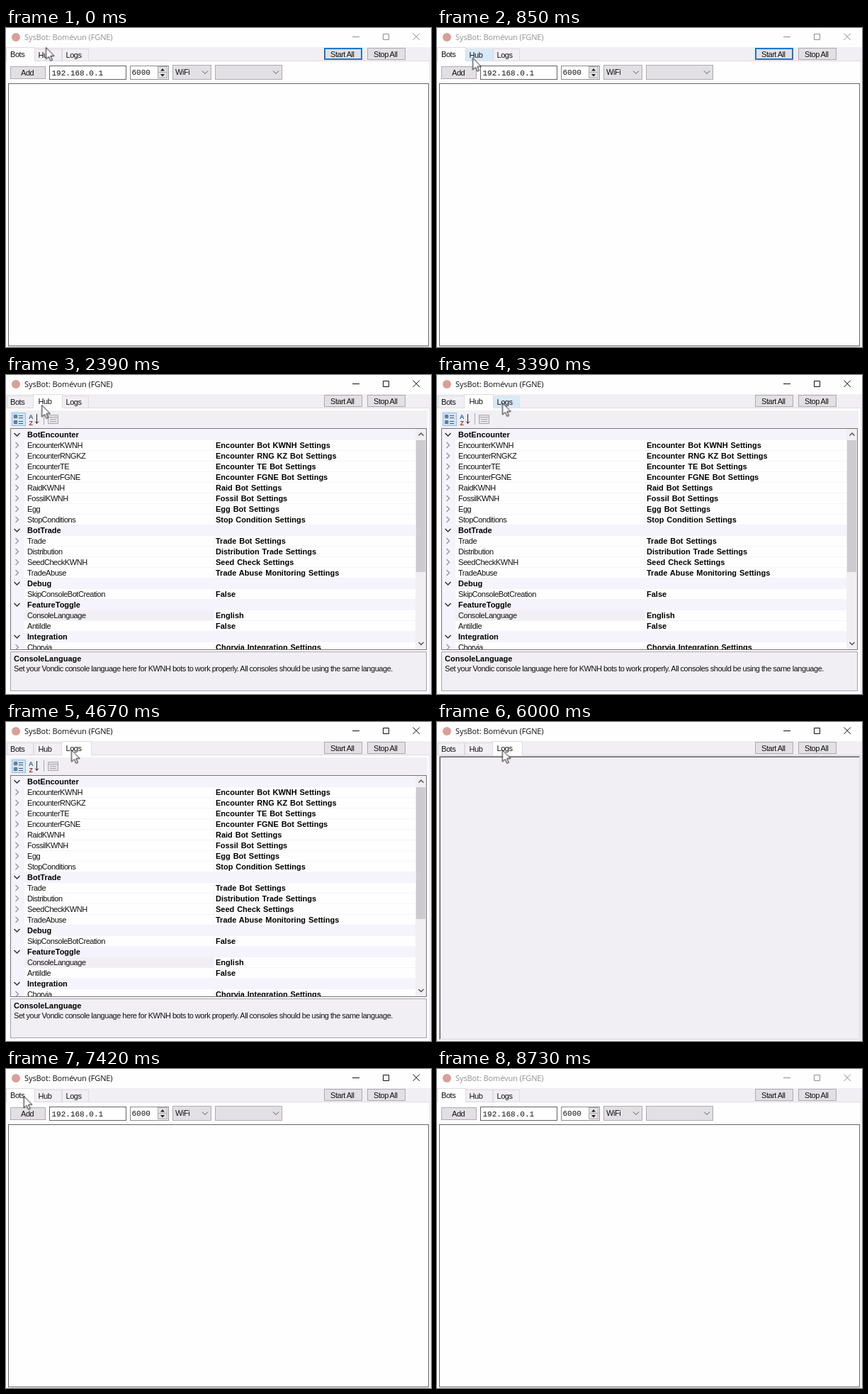
These frames come from a looping animation (600x450 px, 8.91 s). An HTML page:

```html
<!DOCTYPE html>
<html lang="en">
<head>
<meta charset="utf-8">
<title>SysBot</title>
<style>
html, body { margin: 0; width: 100%; height: 100%; overflow: hidden; background: #fff; }
svg { display: block; width: 600px; height: 450px; }
text { font: 11px "Liberation Sans", Arial, sans-serif; letter-spacing: -.45px; word-spacing: -.25px; fill: #111; white-space: pre; }
.bold { font-weight: bold; letter-spacing: 0; word-spacing: .8px; fill: #000; }
.mono { font-family: "Liberation Mono", monospace; letter-spacing: 0; }
.title { font: 11px "Open Sans", "Noto Sans", sans-serif; letter-spacing: -.1px; word-spacing: 0; }
.line { fill: none; stroke: #222; }
.crisp rect, rect.crisp { shape-rendering: crispEdges; }
.button { fill: #e2e0e4; stroke: #adabaf; }
.idle { fill: #f1eff3; stroke: #dddbdf; }
.hot { fill: #d8e9f8; stroke: #d8e4ef; }
.front { fill: #fefefe; stroke: #dddbdf; }

/* Every part shares one 8910 ms clock. */
.timed { animation: 8910ms step-end infinite; }
.inactive { animation-name: inactive; }
.active { animation-name: active; }
.focus { animation-name: focus; }
.bots-tab { animation-name: bots-tab; }
.hub-tab { animation-name: hub-tab; }
.logs-tab { animation-name: logs-tab; }
.bots-hot { animation-name: bots-hot; }
.hub-hot { animation-name: hub-hot; }
.logs-hot { animation-name: logs-hot; }
.bots-bar { animation-name: bots-bar; }
.bots-list { animation-name: bots-list; }
.hub-start { animation-name: hub-start; }
.hub-help { animation-name: hub-help; }
.hub-grid { animation-name: hub-grid; }
.logs-page { animation-name: logs-page; }
.pointer { animation: pointer 8910ms ease-in-out infinite; }

@keyframes inactive { 0%, 97.98% { visibility: visible } 17.059%, 100% { visibility: hidden } }
@keyframes active { 0%, 97.98%, 100% { visibility: hidden } 17.059% { visibility: visible } }
@keyframes focus { 0% { visibility: visible } 17.059%, 100% { visibility: hidden } }
@keyframes bots-tab { 0%, 80.584%, 100% { visibility: visible } 17.059% { visibility: hidden } }
@keyframes hub-tab { 0%, 52.413%, 100% { visibility: hidden } 17.059% { visibility: visible } }
@keyframes logs-tab { 0%, 80.584%, 100% { visibility: hidden } 52.413% { visibility: visible } }
@keyframes bots-hot { 0%, 80.584%, 100% { visibility: hidden } 74% { visibility: visible } }
@keyframes hub-hot { 0%, 17.059%, 74%, 100% { visibility: hidden } 3.4%, 70.3% { visibility: visible } }
@keyframes logs-hot { 0%, 52.413%, 100% { visibility: hidden } 32.4% { visibility: visible } }
@keyframes bots-bar { 0%, 80.92%, 100% { visibility: visible } 18.743% { visibility: hidden } }
@keyframes bots-list { 0%, 80.92%, 100% { visibility: visible } 17.396% { visibility: hidden } }
@keyframes hub-start { 0%, 18.743%, 100% { visibility: hidden } 17.396% { visibility: visible } }
@keyframes hub-help { 0%, 53.086%, 100% { visibility: hidden } 17.396% { visibility: visible } }
@keyframes hub-grid { 0%, 53.086%, 100% { visibility: hidden } 18.743% { visibility: visible } }
@keyframes logs-page { 0%, 80.92%, 100% { visibility: hidden } 53.086% { visibility: visible } }
@keyframes pointer {
  0%, .337% { transform: translate(56.5px, 27.5px) }
  10.213%, 26.487% { transform: translate(50.5px, 42.5px) }
  36.364%, 38.04% { transform: translate(92.5px, 40.5px) }
  38.05%, 67% { transform: translate(92.5px, 39.5px) }
  77.217%, 82.9% { transform: translate(25.5px, 38.5px) }
  90.46%, 100% { transform: translate(-16px, 14px) }
}
</style>
</head>
<body>
<svg viewBox="0 0 600 450">
  <defs>
    <clipPath id="gridClip"><rect x="6" y="75" width="588" height="312"/></clipPath>
    <g id="windowButtons" fill="none" stroke="currentColor">
      <path d="M489 12.5h10M532.5 8.5h8v8h-8z"/>
      <path d="M574.5 7.5l9.5 9.5m0-9.5l-9.5 9.5"/>
    </g>
    <path id="down" d="M-4-2L0 2 4-2" fill="none"/>
  </defs>
  <rect width="600" height="450" fill="#fefefe"/>

  <circle cx="14" cy="13" r="6" fill="#d99f98"/>
  <g class="timed inactive" color="#8f8f8f">
    <text class="title" x="26" y="17" style="fill:#929292">SysBot: Bomévun (FGNE)</text>
    <use href="#windowButtons"/>
  </g>
  <g class="timed active" color="#111">
    <text class="title" x="26" y="17">SysBot: Bomévun (FGNE)</text>
    <use href="#windowButtons"/>
  </g>

  <rect y="27" width="600" height="20" fill="#f1eff3"/>
  <path d="M0 46.5H598.5V450" class="line" style="stroke:#dddbdf"/>
  <rect x="0" y="47" width="598" height="403" fill="#fefefe"/>
  <g id="tabs" class="crisp"></g>

  <g class="crisp">
    <rect class="button" x="449.5" y="28.5" width="53" height="16"/>
    <rect class="button" x="510.5" y="28.5" width="53" height="16"/>
    <rect class="timed focus" x="450" y="29" width="52" height="15" fill="none" stroke="#1279d2" stroke-width="2"/>
    <text x="458" y="41">Start All</text>
    <text x="519" y="41">Stop All</text>
  </g>

  <g class="timed bots-bar crisp">
    <rect class="button" x="6.5" y="54.5" width="49" height="17"/>
    <text x="21" y="67">Add</text>
    <rect x="61.5" y="53.5" width="108" height="19" fill="#fff" stroke="#626262"/>
    <text class="mono" x="64.5" y="67">192.168.0.1</text>
    <rect x="175.5" y="53.5" width="54" height="19" fill="#fff" stroke="#8c8b8e"/>
    <text class="mono" x="177.5" y="66">6000</text>
    <rect class="button" x="214.5" y="54.5" width="13" height="8"/>
    <rect class="button" x="214.5" y="62.5" width="13" height="8"/>
    <path d="M218 60.5h6l-3-3.5zM218 65h6l-3 3.5z" fill="#222"/>
    <rect class="button" x="235.5" y="52.5" width="54" height="20"/>
    <text x="239" y="66">WiFi</text>
    <rect class="button" x="295.5" y="52.5" width="94" height="20"/>
    <use href="#down" x="281" y="62.5" stroke="#555"/>
    <use href="#down" x="381" y="62.5" stroke="#555"/>
  </g>
  <rect class="timed bots-list crisp" x="3.5" y="78.5" width="593" height="370" fill="#fefefe" stroke="#646368"/>
  <path class="timed hub-start line" d="M6 78.5H594" style="stroke:#646368"/>

  <g class="timed hub-help crisp">
    <rect x="6.5" y="390.5" width="587" height="55" fill="#f1eff3" stroke="#a5a1ab"/>
    <text class="bold" x="11" y="404">ConsoleLanguage</text>
    <text x="11" y="418">Set your Vondic console language here for KWNH bots to work properly. All consoles should be using the same language.</text>
  </g>

  <g class="timed hub-grid">
    <rect x="5" y="50" width="590" height="25" rx="2" fill="#f1eff3"/>
    <rect x="8.5" y="53.5" width="19" height="18" fill="#cfe4f7" stroke="#8fc0e8"/>
    <path class="line" d="M11.5 56.5h4v4h-4zM11.5 64.5h4v4h-4zM12 58.5h3M13.5 57v3M12 66.5h3M13.5 65v3" style="stroke:#445d80"/>
    <path class="line" d="M18 57.5h6M18 60.5h6M18 65.5h6M18 68.5h6" style="stroke:#555"/>
    <text class="bold" x="32" y="62" style="font-size:9px;fill:#2d5e9b">A</text>
    <text class="bold" x="32.5" y="71" style="font-size:9px;fill:#8b3c32">Z</text>
    <path class="line" d="M43.5 55v13M41 65.5l2.5 3 2.5-3"/>
    <path class="line" d="M53.5 54v16" style="stroke:#aaa8ad"/>
    <path d="M59.5 56.5h14v12h-14zM59.5 59.5h14M62 62.5h9M62 65.5h9" fill="#e5e3e6" stroke="#aaa8ad"/>
    <g clip-path="url(#gridClip)">
      <rect x="6" y="75" width="588" height="313" fill="#fefefe"/>
      <rect x="7" y="76" width="19" height="312" fill="#f5f3fb"/>
      <g id="rows"></g>
    </g>
    <rect x="578" y="76" width="15" height="311" fill="#f1eff2"/>
    <rect x="579" y="92" width="13" height="186" fill="#cdcbcf"/>
    <path class="line" d="M582.5 85.5l3.5-3.5 3.5 3.5M582.5 377l3.5 3.5 3.5-3.5" style="stroke:#555;stroke-width:1.5"/>
    <rect class="crisp" x="6.5" y="75.5" width="587" height="312" fill="none" stroke="#747278"/>
  </g>

  <g class="timed logs-page">
    <rect x="2" y="47" width="596" height="402" fill="#f1eff3"/>
    <path class="line" d="M3.5 448V48.5H597" style="stroke:#9a989c"/>
    <path class="line" d="M4.5 447V49.5H596" style="stroke:#69676b"/>
    <path class="line" d="M4 447.5H596.5V49" style="stroke:#dddbdf"/>
  </g>

  <path class="pointer" d="M0 0V16.5L3.8 13 6.4 18.8 9 17.6 6.4 12H11.6Z" fill="#fff" stroke="#111"/>
</svg>
<script>
// Label, text x, idle left/right, front left/right
const tabs = [
  ["Bots", 6, 1, 39, 0, 41],
  ["Hub", 45.5, 39, 79, 38, 80],
  ["Logs", 84.5, 79, 117, 78, 121]
];
const box = (cls, left, right, top) =>
  `<rect class="${cls}" x="${left + .5}" y="${top + .5}" width="${right - left - 1}" height="${46 - top}"/>`;
const label = (name, x, y) => `<text x="${x}" y="${y}">${name}</text>`;

const back = tabs.map(([name, x, left, right]) =>
  box("idle", left, right, 29) +
  `<g class="timed ${name.toLowerCase()}-hot">${box("hot", left, right, 29)}</g>` +
  label(name, x, 42));
const front = tabs.map(([name, x, , , left, right]) =>
  `<g class="timed ${name.toLowerCase()}-tab">${box("front", left, right, 27)}` +
  `<rect x="${left + 1}" y="46" width="${right - left - 2}" height="2" fill="#fefefe"/>${label(name, x, 41)}</g>`);
document.getElementById("tabs").innerHTML = back.concat(front).join("");

// "#" opens a category, "-" marks a plain row, "*" the selected plain row.
const settings = `#BotEncounter
EncounterKWNH|Encounter Bot KWNH Settings
EncounterRNGKZ|Encounter RNG KZ Bot Settings
EncounterTE|Encounter TE Bot Settings
EncounterFGNE|Encounter FGNE Bot Settings
RaidKWNH|Raid Bot Settings
FossilKWNH|Fossil Bot Settings
Egg|Egg Bot Settings
StopConditions|Stop Condition Settings
#BotTrade
Trade|Trade Bot Settings
Distribution|Distribution Trade Settings
SeedCheckKWNH|Seed Check Settings
TradeAbuse|Trade Abuse Monitoring Settings
#Debug
-SkipConsoleBotCreation|False
#FeatureToggle
*ConsoleLanguage|English
-AntiIdle|False
#Integration
Chorvia|Chorvia Integration Settings`.split("\n");

document.getElementById("rows").innerHTML = settings.map((line, i) => {
  const y = 84 + i * 15;
  const mark = line[0];
  if (mark === "#") {
    return `<rect x="7" y="${y - 7}" width="571" height="15" fill="#f5f3fb"/>
      <use href="#down" x="15.5" y="${y}" stroke="#333" stroke-width="1.5"/>
      <text class="bold" x="30" y="${y + 4}">${line.slice(1)}</text>`;
  }
  const [name, value] = line.replace(/^[-*]/, "").split("|");
  const arrow = "-*".includes(mark) ? "" :
    `<path class="line" d="M13.5 ${y - 4}l4 4-4 4" style="stroke:#918f95;stroke-width:1.2"/>`;
  const selection = mark === "*" ?
    `<rect x="26" y="${y - 7}" width="267" height="14" fill="#f1eff3"/>` : "";
  return `${selection}<path d="M26 ${y + 7.5}H578M293.5 ${y - 7}v15" stroke="#f5f3fb"/>${arrow}
    ${label(name, 30, y + 4)}<text class="bold" x="296" y="${y + 4}">${value}</text>`;
}).join("");
</script>
</body>
</html>
```
